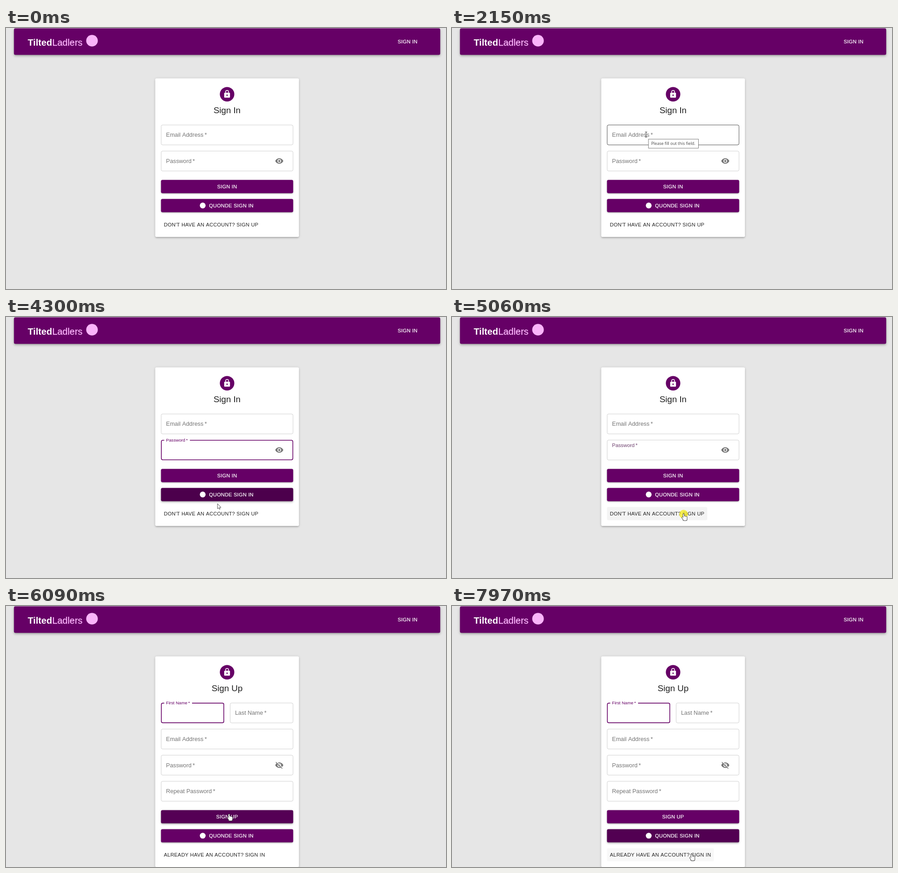
Recreate the animation shown at these times as an HTML page with a canvas. Size 972 px wide and 576 px high, loop 8000 ms.

```html
<!DOCTYPE html>
<html lang="en">
<head>
<meta charset="utf-8">
<title>Sign in form</title>
<style>
html, body { margin: 0; width: 100%; height: 100%; overflow: hidden; background: #e6e6e6; }
canvas { display: block; }
</style>
</head>
<body>
<canvas id="stage" width="972" height="576"></canvas>
<script>
const ctx = document.getElementById('stage').getContext('2d');
// The layout is written for a 1215 x 720 page shown at four fifths
const ZOOM = 0.8, LOOP = 8000, SWITCH = 5130;
const PURPLE = [102, 0, 102], DARK = [71, 0, 71], GREY = [117, 117, 117];
const INK = '#212121', ICON_GREY = '#757575', PINK = '#fab4fa';
const SANS = '"Liberation Sans", Arial, sans-serif';
const LEFT = 428, WIDTH = 365, MIDDLE = 610.5;

// Pointer strokes: start, end, then where it comes to rest
const ENTRY = [1162, 689];
const MOVES = [
  [70, 530, 1041, 554], [860, 1690, 536, 302], [1740, 1840, 536, 294],
  [3000, 3552, 514, 364], [3660, 4300, 584, 515], [4300, 4440, 631, 537],
  [4440, 4600, 644, 550], [4830, 4910, 639.5, 543], [5300, 5840, 622, 558],
  [5970, 6090, 616, 574], [6850, 7350, 631, 631], [7700, 7970, 661, 684]
];
const CLICKS = [2850, 3550, 5060];

const clamp = x => Math.max(0, Math.min(1, x));
const easeOut = (x, power = 3) => 1 - (1 - clamp(x)) ** power;
const smooth = x => x * x * (3 - 2 * x);
const lerp = (a, b, k) => a + (b - a) * k;
const mix = (a, b, k) => `rgb(${a.map((v, i) => Math.round(lerp(v, b[i], k))).join(',')})`;
const MAIN = mix(PURPLE, PURPLE, 0);

function setFont(size, { weight = 400, spacing = 0, family = SANS } = {}) {
  ctx.font = `${weight} ${size}px ${family}`;
  ctx.letterSpacing = spacing * ZOOM + 'px';
}

function text(str, x, y, size, color, opts = {}) {
  setFont(size, opts);
  ctx.textAlign = opts.align || 'left';
  ctx.fillStyle = ctx.strokeStyle = color;
  ctx.fillText(str, x, y);
  if (opts.bolder) {
    ctx.lineWidth = opts.bolder;
    ctx.strokeText(str, x, y);
  }
  return ctx.measureText(str).width;
}

const CAPS = { spacing: 0.5, bolder: 0.3 };
const caps = (str, x, y, color, align) => text(str, x, y, 14, color, { ...CAPS, align });

// Rows of field labels, then two buttons and a link below them
function makePage(title, rows, action, prompt) {
  const items = [];
  rows.forEach((row, r) => row.forEach((label, c) => {
    const w = (WIDTH - 16 * (row.length - 1)) / row.length;
    items.push({ kind: 'field', label, x: LEFT + c * (w + 16), y: 267 + 72 * r, w, h: 56 });
  }));
  let y = 267 + 72 * rows.length + 8;
  const stack = (kind, label, w, mark) => {
    items.push({ kind, label, x: LEFT, y, w, h: 36.5, mark });
    y += 52.5;
  };
  setFont(14, CAPS);
  stack('button', action, WIDTH);
  stack('button', 'QUONDE SIGN IN', WIDTH, true);
  stack('link', prompt, ctx.measureText(prompt).width + 16);
  return { title, items, bottom: y };
}

const signIn = makePage('Sign In', [['Email Address'], ['Password']],
  'SIGN IN', "DON'T HAVE AN ACCOUNT? SIGN UP");
const signUp = makePage('Sign Up',
  [['First Name', 'Last Name'], ['Email Address'], ['Password'], ['Repeat Password']],
  'SIGN UP', 'ALREADY HAVE AN ACCOUNT? SIGN IN');

const FOCUS = [
  { item: signIn.items[0], start: 2840, end: 3550 },
  { item: signIn.items[1], start: 3550, end: 5015 },
  { item: signUp.items[0], start: SWITCH, end: LOOP }
];

const pageAt = t => t < SWITCH ? signIn : signUp;

function pointerAt(t) {
  let [x, y] = ENTRY;
  for (const [start, end, toX, toY] of MOVES) {
    if (t < start) break;
    const k = smooth(clamp((t - start) / (end - start)));
    x = lerp(x, toX, k);
    y = lerp(y, toY, k);
  }
  return [x, y];
}

function hovered(t) {
  const [x, y] = pointerAt(t);
  return pageAt(t).items.find(o => x >= o.x && x <= o.x + o.w && y >= o.y && y <= o.y + o.h);
}

// Eased share of the last 250 ms spent over an item
function hoverFade(item, t) {
  const n = 25;
  let hits = 0;
  for (let i = 0; i < n; i++) {
    if (hovered(t - 250 * (i + 0.5) / n) === item) hits++;
  }
  return easeOut(hits / n, 2);
}

function focusState(item, t) {
  const span = FOCUS.find(f => f.item === item);
  if (!span || t < span.start) return { on: false, shrink: 0 };
  if (t >= span.end) return { on: false, shrink: 1 - easeOut((t - span.end) / 200) };
  const age = t - span.start;
  return { on: true, shrink: easeOut(age / 200), caret: age % 1000 < 500 };
}

function box(x, y, w, h, r = 4) {
  ctx.beginPath();
  ctx.roundRect(x, y, w, h, r);
}

function disc(x, y, r, color) {
  ctx.beginPath();
  ctx.arc(x, y, r, 0, 2 * Math.PI);
  ctx.fillStyle = color;
  ctx.fill();
}

// Casts one shadow only, from a shape placed far off the stage
function shadow(x, y, w, h, dy, blur, spread, alpha) {
  const away = 3000;
  ctx.save();
  ctx.shadowColor = `rgba(0,0,0,${alpha})`;
  ctx.shadowOffsetX = away * ZOOM;
  ctx.shadowOffsetY = dy * ZOOM;
  ctx.shadowBlur = blur * ZOOM;
  ctx.fillStyle = '#000';
  box(x - away - spread, y - spread, w + 2 * spread, h + 2 * spread);
  ctx.fill();
  ctx.restore();
}

// Box lifted off the page by a material-style elevation
function raised(x, y, w, h, color, level) {
  shadow(x, y, w, h, level > 3 ? 2 : 3, level, level > 3 ? -1 : -2, 0.2);
  shadow(x, y, w, h, level, level + 1, 0, 0.14);
  shadow(x, y, w, h, 1, 2 * level + 2, 0, 0.12);
  box(x, y, w, h);
  ctx.fillStyle = color;
  ctx.fill();
}

// 24-unit icon centred on a point
function icon(cx, cy, draw) {
  ctx.save();
  ctx.translate(cx - 12, cy - 12);
  draw();
  ctx.restore();
}

function slash(shift, color) {
  ctx.beginPath();
  ctx.moveTo(2.6 + shift, 3.6 - shift);
  ctx.lineTo(20.4 + shift, 21.4 - shift);
  ctx.lineWidth = 1.8;
  ctx.strokeStyle = color;
  ctx.stroke();
}

function drawEye(crossed) {
  ctx.beginPath();
  ctx.moveTo(1, 12);
  for (const s of [1, -1]) {
    ctx.bezierCurveTo(12 - 9.3 * s, 12 - 4.4 * s, 12 - 5 * s, 12 - 7.5 * s, 12, 12 - 7.5 * s);
    ctx.bezierCurveTo(12 + 5 * s, 12 - 7.5 * s, 12 + 9.3 * s, 12 - 4.4 * s, 12 + 11 * s, 12);
  }
  ctx.fillStyle = ICON_GREY;
  ctx.fill();
  disc(12, 12, 5, '#fff');
  disc(12, 12, 3, ICON_GREY);
  if (crossed) {
    slash(1.25, '#fff');
    slash(0, ICON_GREY);
  }
}

function drawLock() {
  box(4, 8, 16, 14, 2);
  ctx.fillStyle = ctx.strokeStyle = '#fff';
  ctx.fill();
  ctx.beginPath();
  ctx.moveTo(7.95, 9);
  ctx.arc(12, 6, 4.05, Math.PI, 0);
  ctx.lineTo(16.05, 9);
  ctx.lineWidth = 1.9;
  ctx.stroke();
  disc(12, 15, 2, MAIN);
}

function drawField(o, t, over) {
  const { on, shrink, caret } = focusState(o, t);
  const line = on ? 2 : 1;
  box(o.x + line / 2, o.y + line / 2, o.w - line, o.h - line);
  ctx.lineWidth = line;
  ctx.strokeStyle = on ? MAIN : over ? INK : '#c4c4c4';
  ctx.stroke();

  const label = o.label + '\u2009*', size = lerp(16, 12, shrink);
  if (on) {
    setFont(size);
    ctx.fillStyle = '#fff';
    ctx.fillRect(o.x + 9, o.y - 1, (ctx.measureText(label).width + 11) * shrink, 4);
  }
  text(label, o.x + 14, o.y + lerp(33.6, 4.2, shrink), size, mix(GREY, PURPLE, shrink));
  if (caret) {
    ctx.fillStyle = INK;
    ctx.fillRect(o.x + 13.3, o.y + 19.4, 1.2, 17.4);
  }
  if (o.label === 'Password') icon(754.6, o.y + 28, () => drawEye(pageAt(t) === signUp));
}

function drawButton(o, t) {
  const k = hoverFade(o, t), base = o.y + 23.2;
  raised(o.x, o.y, o.w, o.h, mix(PURPLE, DARK, k), 2 + 2 * k);
  if (o.mark) {
    disc(543.2, o.y + 18.2, 8, '#fff');
    caps(o.label, 560.7, base, '#fff');
  } else {
    caps(o.label, MIDDLE, base, '#fff', 'center');
  }
}

function drawLink(o, t) {
  box(o.x, o.y, o.w, o.h);
  ctx.fillStyle = `rgba(0,0,0,${0.045 * hoverFade(o, t)})`;
  ctx.fill();
  text(o.label, o.x + 8, o.y + 23.2, 14, INK, { spacing: CAPS.spacing });
}

function drawHeader() {
  raised(22, 1, 1177, 73, MAIN, 4);
  const w = text('Tilted', 60, 48.5, 25.4, '#fff', { weight: 700 });
  text('Ladlers', 60.5 + w, 48.5, 25.4, PINK, { bolder: 0.4 });
  disc(237.5, 35, 16, PINK);
  caps('SIGN IN', 1081.6, 42.5, '#fff');
}

function drawBeam() {
  ctx.beginPath();
  for (const s of [-7, 7]) {
    ctx.moveTo(-3, s);
    ctx.lineTo(3, s);
  }
  ctx.moveTo(0, -7);
  ctx.lineTo(0, 7);
  ctx.lineWidth = 1.1;
  ctx.stroke();
}

function drawArrow() {
  const arrow = new Path2D('M0 0V14L3.2 11.2 5.2 15.5 7.4 14.5 5.5 10.3H9.6z');
  ctx.fill(arrow);
  ctx.stroke(arrow);
}

// Four fingers, palm and thumb: outlined first, then filled as one shape
function drawHand() {
  const parts = () => {
    ctx.beginPath();
    for (let i = 0; i < 4; i++) ctx.roundRect(-1.5 + 2.6 * i, i ? 5.5 + 0.6 * i : 0, 2.8, 9, 1.4);
    ctx.roundRect(-1.5, 9, 10.6, 9.3, 3);
    ctx.roundRect(-4.4, 9.2, 4.5, 3.6, 1.7);
  };
  parts();
  ctx.lineWidth = 2;
  ctx.stroke();
  ctx.fill();
}

function drawPointer(t, over) {
  if (t < MOVES[0][0]) return;
  const [x, y] = pointerAt(t);
  if (CLICKS.some(c => t >= c && t < c + 160)) disc(x, y + 1, 12, 'rgba(245,235,30,0.75)');
  ctx.save();
  ctx.translate(x, y);
  ctx.lineWidth = 1;
  ctx.strokeStyle = '#222';
  ctx.fillStyle = '#fff';
  if (!over) drawArrow();
  else if (over.kind === 'field') drawBeam();
  else drawHand();
  ctx.restore();
}

function drawTooltip() {
  ctx.fillStyle = '#fff';
  ctx.fillRect(542.5, 306.5, 138, 25);
  ctx.lineWidth = 1;
  ctx.strokeStyle = '#575757';
  ctx.strokeRect(542.5, 306.5, 138, 25);
  text('Please fill out this field.', 550, 323, 11.4, '#444',
    { family: '"Open Sans", "Noto Sans", sans-serif' });
}

function render(t) {
  const page = pageAt(t), over = hovered(t);
  ctx.setTransform(ZOOM, 0, 0, ZOOM, 0, 0);
  ctx.fillStyle = '#e6e6e6';
  ctx.fillRect(0, 0, 1215, 720);
  drawHeader();
  raised(412, 139, 397, page.bottom - 139, '#fff', 3);

  disc(MIDDLE, 182.7, 20, MAIN);
  icon(MIDDLE, 182.3, drawLock);
  text(page.title, MIDDLE, 234.8, 24, INK, { align: 'center' });

  for (const o of page.items) {
    if (o.kind === 'field') drawField(o, t, o === over);
    else if (o.kind === 'button') drawButton(o, t);
    else drawLink(o, t);
  }
  if (t >= 2150 && t < 2850) drawTooltip();
  drawPointer(t, over);
}

function loop() {
  render(performance.now() % LOOP);
  requestAnimationFrame(loop);
}
loop();
</script>
</body>
</html>
```
